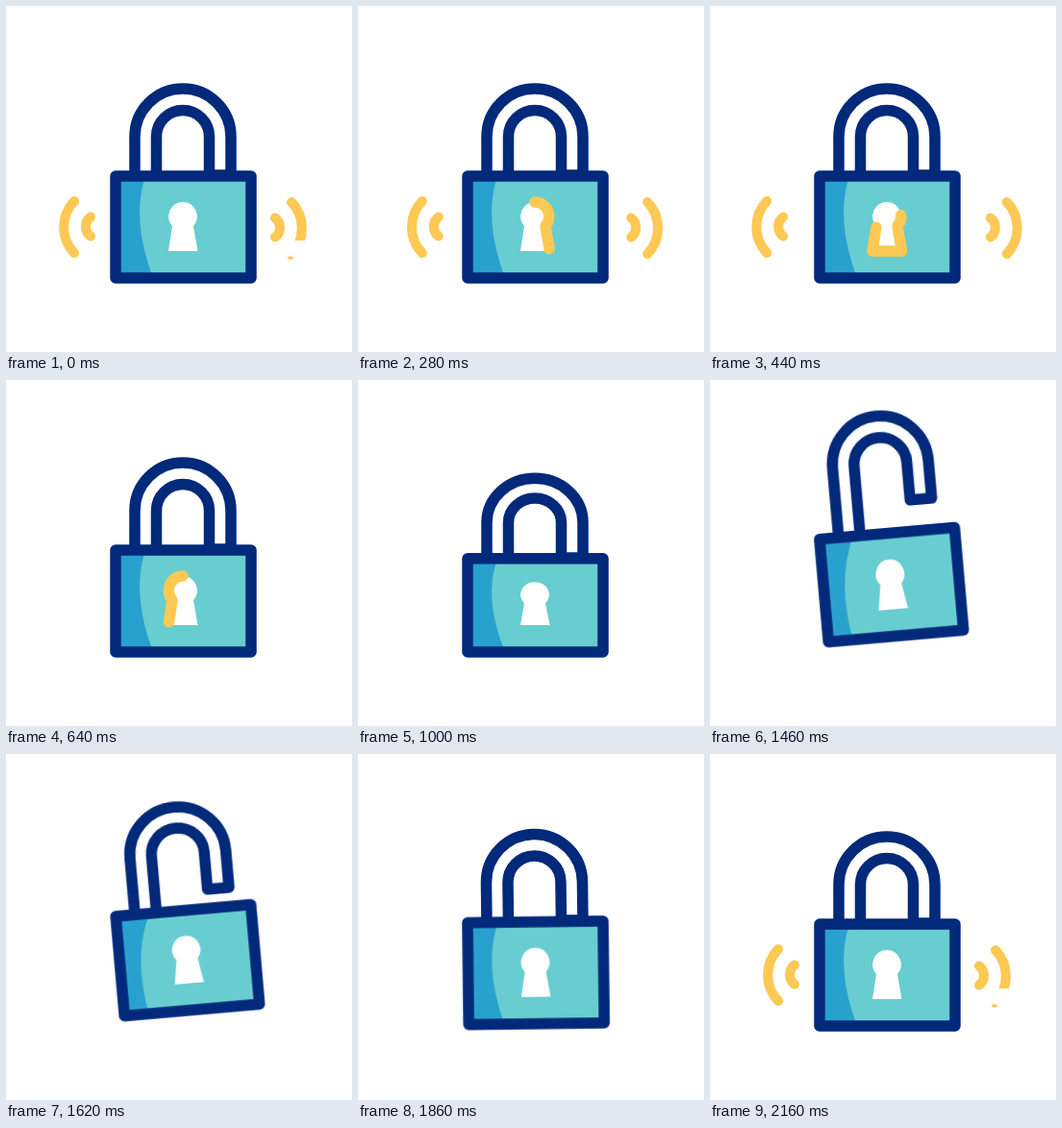
Recreate the animation shown at these times as an HTML page. Size 360 px wide and 360 px high, loop 2.2 s.

```html
<!DOCTYPE html>
<html lang="en">
<head>
<meta charset="utf-8">
<title>Unlocking padlock</title>
<style>
  html, body { margin: 0; width: 100%; height: 100%; overflow: hidden; background: #fff; }
  svg { display: block; width: 100%; height: 100%; }
  .line { fill: none; stroke: #03297b; stroke-width: 11.5; stroke-linejoin: round; vector-effect: non-scaling-stroke; }
  .wave, #trace { fill: none; stroke: #fdc853; stroke-width: 10; stroke-linecap: round; }
  #trace { stroke-width: 11.5; stroke-linejoin: round; }
</style>
</head>
<body>
<svg viewBox="0 0 360 360">
  <defs>
    <g id="waves">
      <path class="wave" d="M71 203A39 39 0 0 0 71 257"/>
      <path class="wave" d="M88 219.500A12.500 12.500 0 0 0 88 239.500"/>
    </g>
    <path id="hole" d="M184 204A15 15 0 0 1 195 229L199.500 255H169L173 229A15 15 0 0 1 184 204"/>
  </defs>

  <g id="signal">
    <use id="left" href="#waves"/>
    <g transform="translate(368 1) scale(-1 1)"><use id="right" href="#waves"/></g>
    <g id="gap">
      <path fill="#fff" d="M292 244h26v24h-26z"/>
      <ellipse cx="296" cy="262" rx="3" ry="1.700" fill="#fdc853"/>
    </g>
  </g>

  <g id="lock">
    <g id="shackle">
      <path id="shine" fill="#d8f2f5" d="M215 120L229 114V152L215 158Z"/>
      <path class="line" d="M134 230V136a50 50 0 0 1 100 0V176H211.500V136a27.500 27.500 0 0 0-55 0V230"/>
    </g>
    <g id="body">
      <path fill="#68cdd0" d="M114 177H255V283H114Z"/>
      <path id="shade" fill="#28a1ce"/>
      <path class="line" d="M114 177H255V283H114Z"/>
    </g>
    <g id="keyhole">
      <use href="#hole" fill="#fff"/>
      <use href="#hole" id="trace"/>
    </g>
  </g>
</svg>
<script>
const LOOP = 2200;
const $ = id => document.getElementById(id);
const clamp = x => Math.min(1, Math.max(0, x));
const ramp = (t, from, to) => clamp((t - from) / (to - from));
const ease = u => (1 - Math.cos(Math.PI * u)) / 2;
const move = (id, transform) => $(id).setAttribute('transform', transform);

// Vertical scale that keeps height y in place
const stretch = (s, y) => `translate(0 ${y * (1 - s)}) scale(1 ${s})`;

// Eased value of a list of [time, value] keys
function track(keys, t) {
  let value = keys[0][1];
  for (let i = 1; i < keys.length; i++) {
    const [t0, v0] = keys[i - 1], [t1, v1] = keys[i];
    if (t >= t0) value = v0 + (v1 - v0) * ease(ramp(t, t0, t1));
  }
  return value;
}

const squash = [[820, 1], [1000, .917], [1200, 1.05], [1280, 1.05], [1620, .98], [1900, 1]];
const tilt = [[1080, 0], [1280, 1], [1740, 1], [1900, 0]];
const lift = [[1020, 0], [1210, 36], [1280, 34.7], [1380, 34.7], [1900, 0]];
const BASE = 283;
const holeLength = $('hole').getTotalLength();

function drawWaves(t) {
  const leaving = t < 1200;
  const shift = leaving ? -23 * ramp(t, 120, 620) ** 1.5 : 14 * (1 - ease(ramp(t, 1940, 2140)));
  move('left', `translate(${shift})`);
  move('right', `translate(${shift})`);
  $('signal').setAttribute('opacity', leaving ? 1 - ramp(t, 460, 620) : ramp(t, 1940, 2080));
  $('gap').setAttribute('visibility', t < 120 || t >= 2140 ? 'visible' : 'hidden');
}

function drawTrace(t) {
  const head = ramp(t, 120, 540), tail = ramp(t, 380, 800);
  const trace = $('trace');
  trace.setAttribute('visibility', head > tail ? 'visible' : 'hidden');
  trace.setAttribute('stroke-dasharray', `${(head - tail) * holeLength} ${holeLength * 2}`);
  trace.setAttribute('stroke-dashoffset', -tail * holeLength);
}

function drawLock(t) {
  const k = track(tilt, t), s = track(squash, t);
  move('lock', `translate(${9 * k} ${-16.6 * k}) rotate(${-5 * k} 184.5 ${BASE})`);
  move('body', stretch(s, BASE));
  move('keyhole', stretch(s ** 1.5, 255));
  // The shackle is squashed with the body but never stretched
  move('shackle', `${stretch(Math.min(s, 1), BASE)} translate(0 ${-track(lift, t)})`);
  $('shade').setAttribute('d', `M114 177H${145 + 4 * k}Q${130 - 2 * k} 222 ${153 - 13.5 * k} ${BASE}H114Z`);
  $('shine').setAttribute('opacity', ramp(t, 1180, 1260) * (1 - ramp(t, 1300, 1440)));
}

function frame(now) {
  const t = now % LOOP;
  drawWaves(t);
  drawTrace(t);
  drawLock(t);
  requestAnimationFrame(frame);
}
frame(performance.now());
</script>
</body>
</html>
```
